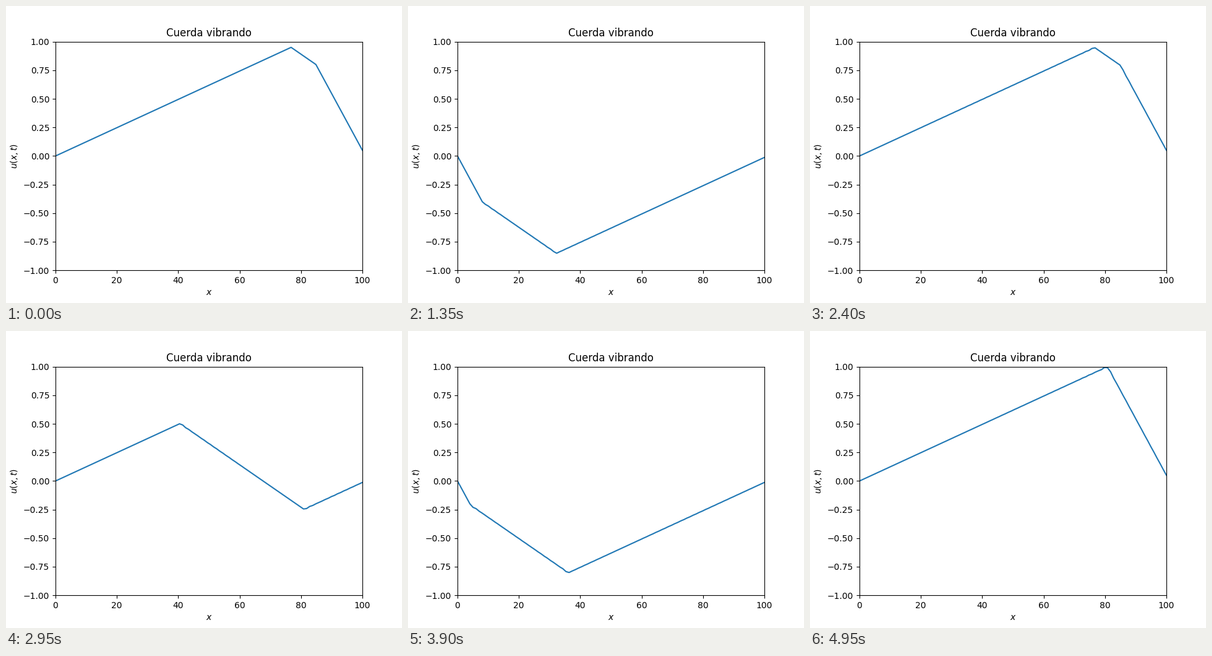
A matplotlib script that plays this animation: 640x480 px, repeating every 5 s.

```python
import numpy as np
import matplotlib.pyplot as plt
from matplotlib.animation import FuncAnimation

FRAMES = 100
STEPS_PER_FRAME = 4
NODES = 101
TENSION, DENSITY = 40.0, 0.01
DT, DX = 0.0158, 1.0


def pluck():
    """String pulled up at node 80, fixed at both ends."""
    i = np.arange(NODES)
    return np.where(i <= 80, 0.0125 * i, 1 - 0.05 * (i - 80))


def bend(u):
    """Second difference, zero at the fixed ends."""
    d = np.zeros_like(u)
    d[1:-1] = u[2:] - 2 * u[1:-1] + u[:-2]
    return d


def simulate(steps):
    """Explicit leapfrog solution of the wave equation."""
    ratio = TENSION / DENSITY * (DT / DX) ** 2
    u = np.zeros((steps + 1, NODES))
    u[0] = pluck()
    u[1] = u[0] + 0.5 * ratio * bend(u[0])
    for n in range(1, steps):
        u[n + 1] = 2 * u[n] - u[n - 1] + ratio * bend(u[n])
    return u


history = simulate(FRAMES * STEPS_PER_FRAME)
x = np.linspace(0, 100, NODES - 1)

fig, ax = plt.subplots(figsize=(6.4, 4.8), dpi=100)
ax.set_xlim(0, 100)
ax.set_ylim(-1, 1)
ax.set_title("Cuerda vibrando")
ax.set_xlabel("$x$")
ax.set_ylabel("$u(x,t)$")
line, = ax.plot([], [])


def update(frame):
    line.set_data(x, history[STEPS_PER_FRAME * (frame + 1), :-1])
    return line,


anim = FuncAnimation(fig, update, frames=FRAMES, interval=50, repeat=True)
plt.show()
```
